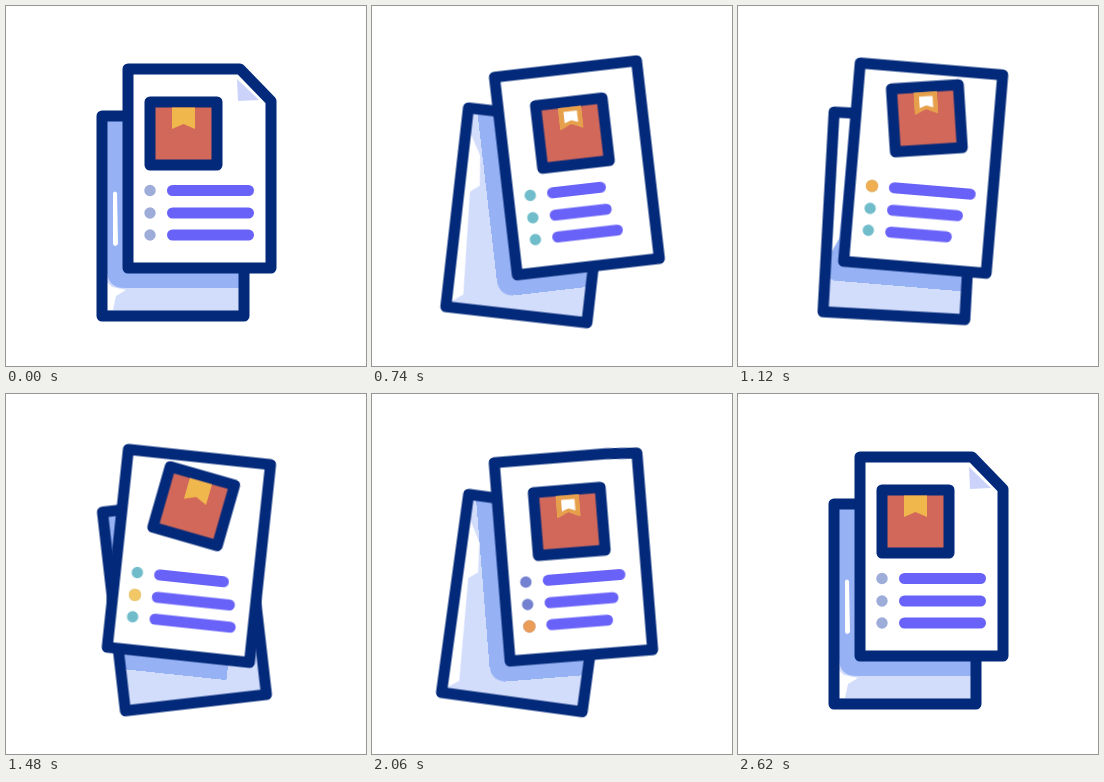
Write an HTML page that moves like this. It is 360 px wide and 360 px high and loops after 3000 ms.

```html
<!DOCTYPE html>
<html lang="en">
<head>
<meta charset="utf-8">
<title>Documents</title>
<style>
  html, body { margin: 0; width: 100%; height: 100%; overflow: hidden; background: #fff; }
  svg { display: block; width: 100vw; height: 100vh; }

  .ink { fill: none; stroke: #02297a; stroke-width: 11; stroke-linejoin: round; }
  .white { fill: #fff; }

  .front, .back, .page, .shift, .tilt, .bar, .dot, .flash, .step {
    animation: 3s cubic-bezier(.37, 0, .63, 1) infinite both;
  }
  .front { transform-origin: 193.5px 63px; animation-name: front; }
  .back  { transform-origin: 167px 110px; animation-name: back; }
  .page  { animation-name: corner; }
  .shift { animation-name: shift; }
  .tilt  { transform-origin: 177.5px 127.5px; animation-name: tilt; }

  /* the two sheets swing in opposite phase */
  @keyframes front {
    0%, 6.67% { transform: rotate(0deg); }
    25%       { transform: rotate(-6.6deg); }
    44%       { transform: rotate(9deg); }
    62.3%     { transform: rotate(-5.8deg); }
    83.3%, to { transform: rotate(0deg); }
  }
  @keyframes back {
    0%, 11%   { transform: rotate(0deg); }
    30%       { transform: rotate(7.9deg); }
    49%       { transform: rotate(-6.6deg); }
    67.3%     { transform: rotate(7.9deg); }
    87.3%, to { transform: rotate(0deg); }
  }

  /* the cut corner straightens and returns */
  @keyframes corner {
    0%, 11%, 83.3%, to { d: path("M122 63H234L265 95V262H122Z"); }
    24%, 66%           { d: path("M122 63H234L265 63V262H122Z"); }
  }

  @keyframes shift {
    0%, 11%, 83.3%, to { transform: translate(0px, 0px); }
    24.7%, 65%, 66%    { transform: translate(15.5px, 0px); }
    37%, 49%           { transform: translate(15.5px, -15px); }
  }
  @keyframes tilt {
    0%, 25.3%, 65.3%, to { transform: rotate(0deg); }
    36%                  { transform: rotate(-8.8deg); }
    50.7%                { transform: rotate(10.3deg); }
  }

  .bar {
    fill: none; stroke: #6962f8; stroke-width: 11; stroke-linecap: round;
    stroke-dasharray: 76px 200px;
  }
  .b1 { animation-name: bar1; }
  .b2 { animation-name: bar2; }
  .b3 { animation-name: bar3; }
  @keyframes bar1 {
    0%, 7.5%, 36.8%, 43%, 72.3%, to { stroke-dasharray: 76px 200px; }
    22.2%, 57.6% { stroke-dasharray: 46px 200px; }
  }
  @keyframes bar2 {
    0%, 14.1%, 43.4%, 46.1%, 75.4%, to { stroke-dasharray: 76px 200px; }
    28.8%, 60.7% { stroke-dasharray: 46px 200px; }
  }
  @keyframes bar3 {
    0%, 17.1%, 46.3%, 48.3%, 77.6%, to { stroke-dasharray: 76px 200px; }
    31.7%, 63% { stroke-dasharray: 46px 200px; }
  }

  .dot { animation-name: tint; animation-timing-function: step-end; }
  @keyframes tint {
    0%, 87.3%, to { fill: #9dacd9; }
    7.3%  { fill: #a3c6df; }
    18%   { fill: #70bcca; }
    61%   { fill: #7480d0; }
  }
  .flash { fill: #f0ae52; opacity: 0; animation-name: flash; animation-timing-function: step-end; }
  .f2 { fill: #f2c766; animation-delay: .38s; }
  .f3 { fill: #ea9c58; animation-delay: .9s; }
  @keyframes flash {
    0%, 44.7%, to { opacity: 0; }
    31.3% { opacity: 1; }
  }

  .step { animation-timing-function: step-end; }
  .rest { animation-name: rest; }
  .glow { animation-name: glow; }
  .wash { animation-name: wash; }
  .edge { animation-name: edge; }
  @keyframes rest {
    0%, 87.3%, to { opacity: 1; }
    7.3% { opacity: 0; }
  }
  @keyframes glow {
    0%, 43.3%, 80%, to { opacity: 0; }
    7.3%, 61.3% { opacity: 1; }
  }
  @keyframes wash {
    0%, 25.3%, 79%, to { opacity: 0; }
    18%, 61.3% { opacity: 1; }
  }
  @keyframes edge {
    0%, 43.3%, to { opacity: 0; }
    32% { opacity: 1; }
  }
</style>
</head>
<body>
<svg viewBox="0 0 360 360">
  <defs>
    <clipPath id="sheet"><rect class="back" x="96" y="110" width="142" height="200"/></clipPath>
  </defs>

  <!-- back sheet -->
  <g class="back">
    <rect x="96" y="110" width="142" height="200" fill="#d2dcfb"/>
    <path class="white step wash" d="M101 135L113 156L116 186L107 193L112 296L101 304Z"/>
  </g>
  <g clip-path="url(#sheet)">
    <path class="front" d="M101 42H244V282H119Q101 282 101 264Z" fill="#97b2f4"/>
  </g>
  <g class="back">
    <path class="white step edge" d="M101 115H114L108 236L101 250Z"/>
    <path class="white step rest" d="M107 187Q109 184 111 187L112 238Q109 242 107 238Z"/>
    <path class="white step rest" d="M101 276L106 281L120 284L110 290L107 304H101Z"/>
    <rect class="ink" x="96" y="110" width="142" height="200"/>
  </g>

  <!-- front sheet -->
  <g class="front">
    <path class="ink page" style="fill:#fff" d="M122 63H234L265 95V262H122Z"/>
    <path class="step rest" d="M231 73L253 94L232 95Z" fill="#ccd3fa"/>

    <g class="shift"><g class="tilt">
      <rect class="ink" style="fill:#d2685a" x="144" y="96" width="67" height="63"/>
      <path d="M166 101.5H189V123L177.5 118L166 123Z" fill="#f0b74c"/>
      <g class="step glow">
        <path d="M166 101.5H189V123L177.5 118L166 123Z" fill="#e6a04c"/>
        <path class="white" d="M171 105.5H184.5V117L177.7 114.5L171 117Z"/>
      </g>
    </g></g>

    <path class="bar b1" d="M166.5 184.5h76"/>
    <path class="bar b2" d="M166.5 207h76"/>
    <path class="bar b3" d="M166.5 229h76"/>

    <circle class="dot" cx="144" cy="184.5" r="5.7"/>
    <circle class="dot" cx="144" cy="207" r="5.7"/>
    <circle class="dot" cx="144" cy="229" r="5.7"/>
    <circle class="flash" cx="144" cy="184.5" r="6.2"/>
    <circle class="flash f2" cx="144" cy="207" r="6.2"/>
    <circle class="flash f3" cx="144" cy="229" r="6.2"/>
  </g>
</svg>
</body>
</html>
```
